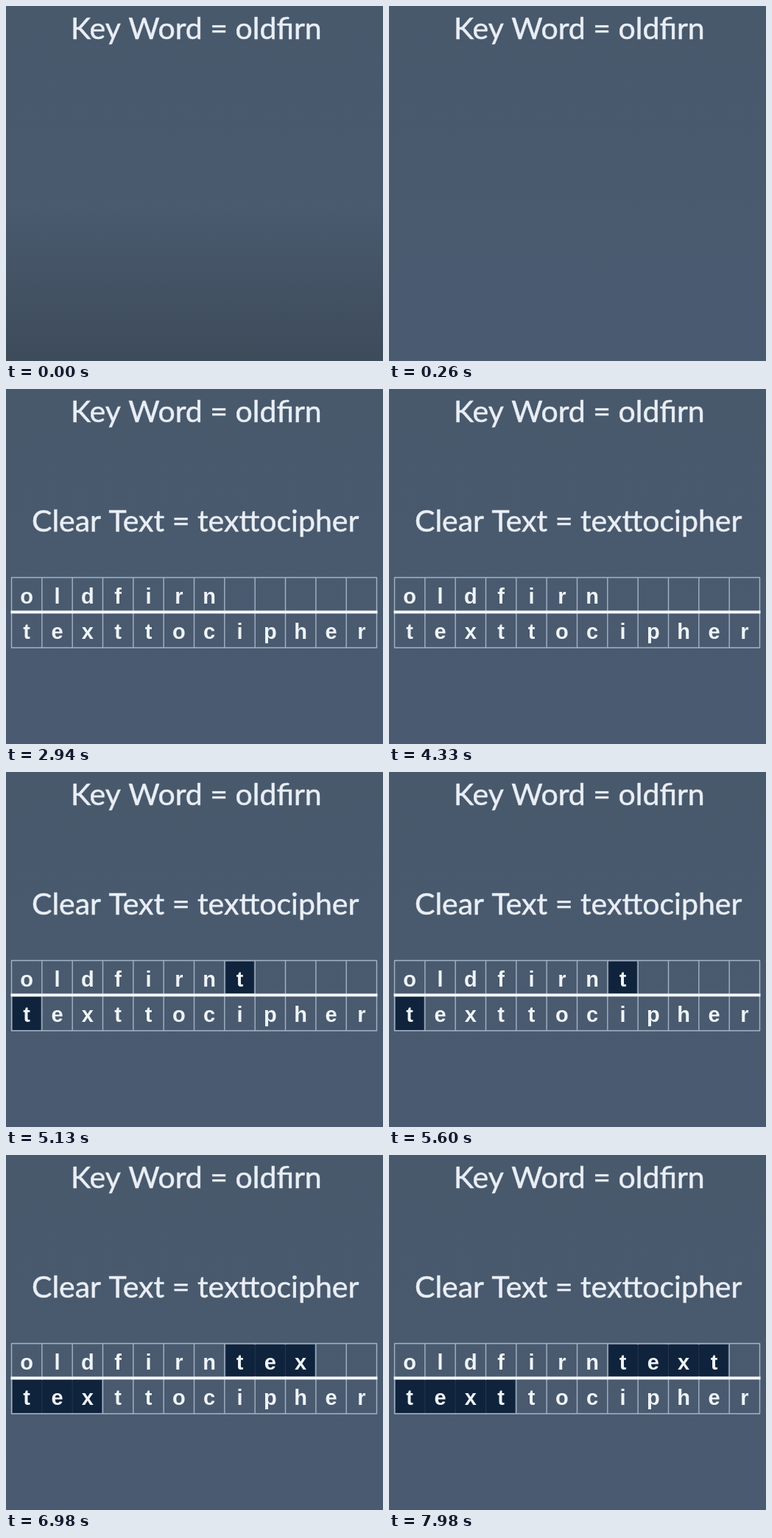
These frames come from a looping animation (512x483 px, 8000 ms). An HTML page with a canvas:

```html
<!DOCTYPE html>
<html lang="en">
<head>
<meta charset="utf-8">
<title>Autokey cipher</title>
<style>
  html, body { margin: 0; width: 100%; height: 100%; overflow: hidden; background: #49596d; }
  canvas { display: block; width: 100vw; height: 100vh; }
</style>
</head>
<body>
<canvas id="stage" width="512" height="483"></canvas>
<script>
const ctx = document.getElementById("stage").getContext("2d");
const LOOP = 8000;
const KEY = "oldfirn", CLEAR = "texttocipher";
const GRID_START = 2270;
const HIGHLIGHTS = [5130, 6120, 6910, 7850];
const LEFT = 7.5, RIGHT = 503.5, TOP = 256.5, MIDDLE = 303.5, BOTTOM = 352;
const CELL = (RIGHT - LEFT) / CLEAR.length;

function verticalFill(y0, y1, from, to) {
  const gradient = ctx.createLinearGradient(0, y0, 0, y1);
  gradient.addColorStop(0, from);
  gradient.addColorStop(1, to);
  ctx.fillStyle = gradient;
  ctx.fillRect(0, y0, 512, 483 - y0);
}

function heading(text, x, y) {
  ctx.font = "41px Lato, sans-serif";
  ctx.textAlign = "left";
  ctx.fillStyle = ctx.strokeStyle = "#e9eef6";
  ctx.lineWidth = 0.5;
  ctx.fillText(text, x, y);
  ctx.strokeText(text, x, y);
}

function line(x0, y0, x1, y1, width, color) {
  ctx.lineWidth = width;
  ctx.strokeStyle = color;
  ctx.beginPath();
  ctx.moveTo(x0, y0);
  ctx.lineTo(x1, y1);
  ctx.stroke();
}

function letters(text, y) {
  ctx.font = "bold 29px 'Liberation Sans', Arial, sans-serif";
  ctx.textAlign = "center";
  ctx.fillStyle = "#eff4fa";
  [...text].forEach((c, i) => ctx.fillText(c, LEFT + CELL * (i + 0.5), y));
}

// Darkens a run of neighbouring cells in one row.
function highlight(first, count, y, height) {
  if (!count) return;
  const x = LEFT + CELL * first;
  ctx.fillStyle = "#10233c";
  ctx.fillRect(x + 1.5, y, CELL * count - 3, height);
  for (let i = 1; i < count; i++)
    line(x + CELL * i, y, x + CELL * i, y + height, 1, "#24374f");
}

function grid(copied) {
  const thin = "#a3b3c8";
  for (let i = 0; i <= CLEAR.length; i++) {
    const x = LEFT + CELL * i;
    line(x, TOP, x, BOTTOM, 1.4, thin);
  }
  for (const y of [TOP, BOTTOM]) line(LEFT - 0.5, y, RIGHT + 0.5, y, 1.4, thin);
  highlight(KEY.length, copied, 258, 43);
  highlight(0, copied, 306, 45);
  line(LEFT - 1, MIDDLE, RIGHT + 1, MIDDLE, 4, "#f4f8fc");
  letters(KEY + CLEAR.slice(0, copied), 292);
  letters(CLEAR, 340);
}

function draw(t) {
  verticalFill(0, 483, "#49596c", "#4a5a70");
  ctx.globalAlpha = t < 200 ? 1 : t < 260 ? 0.3 : 0;
  verticalFill(272, 483, "rgba(61,75,90,0)", "rgb(61,75,90)");
  ctx.globalAlpha = 1;

  heading("Key Word = " + KEY, 88, 45);
  if (t < GRID_START) return;
  heading("Clear Text = " + CLEAR, 35, 194);
  grid(HIGHLIGHTS.filter(start => t >= start).length);
}

function frame() {
  draw(performance.now() % LOOP);
  requestAnimationFrame(frame);
}
frame();
</script>
</body>
</html>
```
